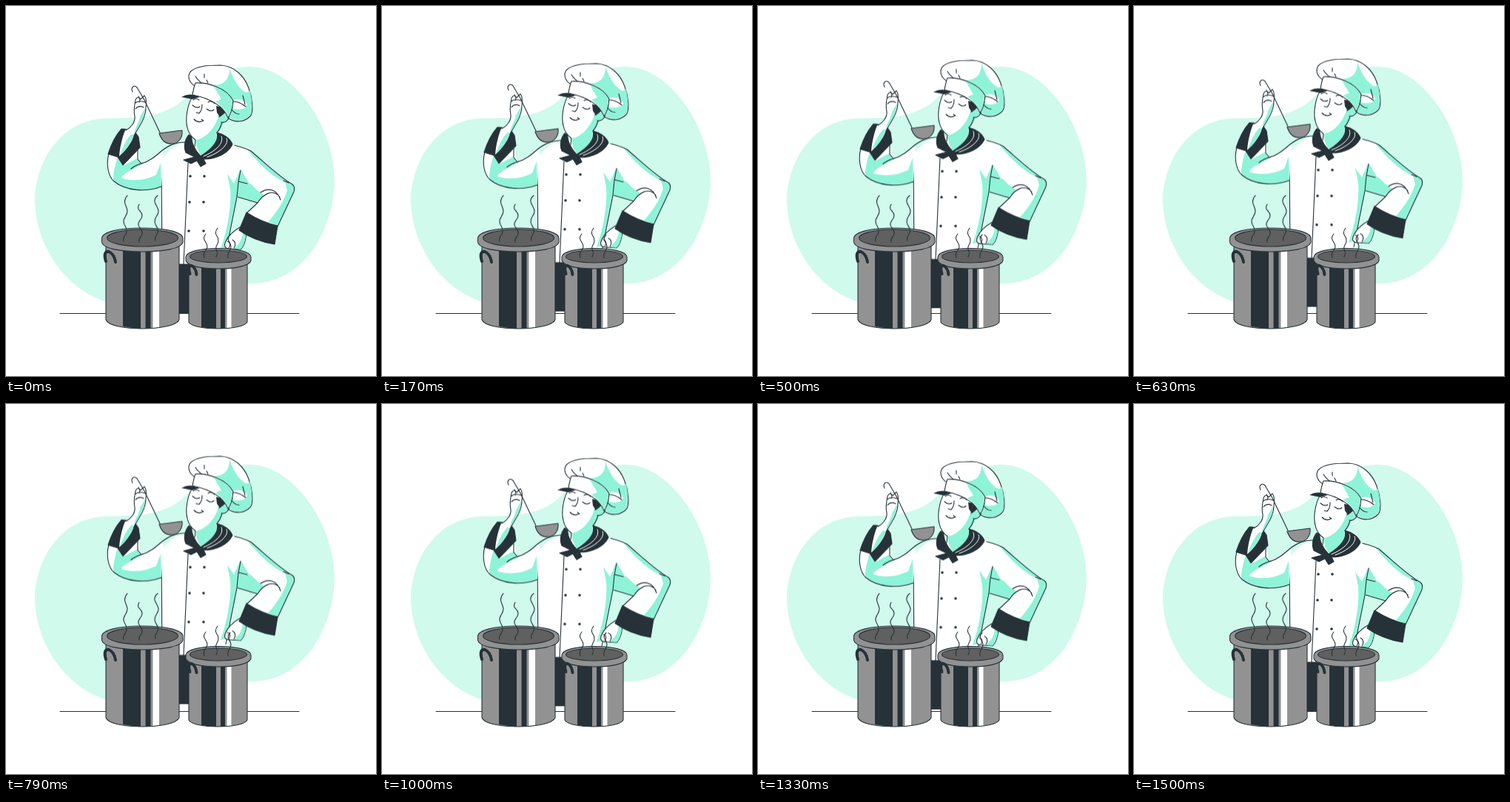
Animation, 500 px wide and 500 px high, one loop 1540 ms. Source, as an HTML page:

```html
<!DOCTYPE html>
<html lang="en">
<head>
<meta charset="utf-8">
<title>Chef tasting</title>
<style>
  html, body { margin: 0; width: 100%; height: 100%; overflow: hidden; background: #fff; }
  svg { display: block; width: 100%; height: 100%; }
  .ink { fill: #263238; }
  .mint { fill: #8ff3d8; }
  .white { fill: #fff; }
  .steel { fill: #929292; }
  .soup { fill: #606060; }
  .line { fill: none; }
  .edge { stroke: #263238; stroke-width: 1.1; stroke-linecap: round; stroke-linejoin: round; }
  .handle { fill: none; stroke: #263238; stroke-width: 4; stroke-linecap: round; }
  .fold { fill: none; stroke: #fff; stroke-width: 1; stroke-linecap: round; }
  .chef { animation: float 1540ms linear infinite; }
  @keyframes float {
    0%, 97.403%, 100% { transform: translateY(0); }
    48.701% { transform: translateY(-10px); }
  }
</style>
</head>
<body>
<svg viewBox="0 0 500 500">
  <path fill="#cffaec" d="M39 262C40 214 70 156 132 152C170 151 207 153 237 129C263 105 287 82 330 82C390 83 444 165 444 235C444 292 409 373 334 375C260 376 214 408 158 404C95 399 40 335 39 262Z"/>
  <path class="line edge" d="M73 415.5H396"/>

  <g class="chef">
    <path class="ink" d="M225 349H262V415H225Z"/>

    <g id="far-arm">
      <path class="white" d="M303 187C314 189 323 192 331 196C350 212 368 230 387 241Q391 244 389 251L367 298L325 280L340 266L313 258L300 230Z"/>
      <path class="mint" d="M326 194L331 196C350 212 368 230 387 241Q391 244 389 251L367 297L354 292C364 281 375 266 380 249L377 238C358 230 341 212 326 194Z"/>
      <path class="mint" d="M314 215L328 239L351 252L340 266L313 258Z"/>
      <path class="white" d="M318 214L331 236L362 248L349 255C335 248 323 232 318 214Z"/>
      <path class="line edge" d="M303 187C314 189 323 192 331 196C350 212 368 230 387 241Q391 244 389 251L367 298M313 258L340 266L325 280M340 266C347 255 360 246 370 258M344 252C354 245 366 247 371 262M375 236L382 239"/>
    </g>

    <g id="coat">
      <path class="white" d="M243 184C231 186 215 197 208 213L211 349H297L313 258L314 237L319 211L308 187Z"/>
      <path class="mint" d="M299 227L308 240L317 220L313 258L299 326L290 328C299 304 305 270 303 247Z"/>
      <path class="line edge" d="M210 213L211 349M246 212L240 349M317 222L314 238L312 258L297 334M314 237L326 240M232 349H247"/>
      <g class="ink">
        <circle cx="249" cy="230" r="1.8"/><circle cx="268" cy="230" r="1.8"/>
        <circle cx="248" cy="265" r="1.8"/><circle cx="267" cy="265" r="1.8"/>
        <circle cx="247" cy="304" r="1.8"/><circle cx="267" cy="304" r="1.8"/>
      </g>
    </g>

    <g id="fist">
      <path class="white edge" d="M316 299C306 305 300 311 297 318C294 324 296 328 301 328L317 329C322 325 324 316 325 307Z"/>
      <path class="mint" d="M320 306L324.500 308C323 318 321 325 317 328.500L307 328C315 323 319 316 320 306Z"/>
      <path class="line edge" d="M299 318C303 319 304 323 301 327M306 316C310 318 311 323 308 327"/>
      <path class="ink edge" d="M325 279C339 288 353 294 367 297L363 322C345 319 329 313 315 303Z"/>
    </g>

    <g id="near-arm">
      <path class="white" d="M139 199C135 214 138 230 146 237C162 250 189 252 210 244L213 196C202 204 194 209 183 214L179 195Z"/>
      <path class="mint" d="M151 203L158 216L177 206L184 214L163 225C158 229 154 231 157 233C176 238 192 234 203 228L209 212L210 244C189 252 162 250 146 237C143 232 148 214 151 203Z"/>
      <path class="line edge" d="M139 199C135 214 138 230 146 237C162 250 189 252 210 244M243 184C228 184 219 189 210 196C202 203 194 210 183 213L178 207V195M185 212C179 214 173 216 169 220"/>
      <path class="ink edge" d="M156 166C148 175 142 187 138 200L151 204L158 215L181 191L179 177L172 167Z"/>
      <path class="white" d="M161 168C157 178 154 190 153 203C161 195 170 186 173 174L178 160H170Z"/>
      <path class="mint" d="M174 169C171 182 163 195 154 202C159 187 164 177 174 169Z"/>
      <path class="white edge" d="M162 168C169 164 175 157 174 149C172 142 174 132 175 127C177 122 180 123 182 126L187 121C190 125 190 130 189 137C189 146 186 152 184 156C180 163 177 168 173 175"/>
      <path class="mint" d="M188 138C188 147 185 152 183 156C180 162 177 167 173 173C174 164 180 158 181 150Z"/>
      <path class="line edge" d="M175 131C178 128 182 128 188 130M175 139C178 135 182 135 186 137M179 122C181 125 182 127 180 130"/>
    </g>

    <g id="ladle">
      <path class="line edge" d="M171 116C168 110 173 106 177 110L187 127L208 171"/>
      <path class="steel edge" d="M207 172L238 168C239 178 233 186 224 186C215 187 210 181 207 172Z"/>
    </g>

    <g id="head">
      <path class="white" d="M253 119C245 132 242 153 245 164C247 174 252 178 256 181L254 190L263 205L286 190L285 172C291 166 293 157 298 145L285 126Z"/>
      <path class="mint" d="M288 146L294 155C292 164 289 169 284 171L287 190L264 203C258 194 256 187 257 181C270 179 283 165 288 146Z"/>
      <path class="line edge" d="M253 121C245 132 242 153 245 164C247 174 252 178 256 181L255 190M292 157C290 164 288 168 285 171"/>
      <path class="mint edge" d="M288 150C289 142 298 140 301 146C303 152 297 159 291 157"/>
      <path class="ink" d="M284 135L299 138C299 143 296 144 293 147L289 150L285 144Z"/>
      <path class="line edge" d="M253 127Q257 124 261 127M273 130Q278 127 282 132M252 134Q257 139 262 136M271 139Q277 144 281 140M265 133C265 138 263 143 261 145L257 144M254 153Q260 159 266 155M264 153L267 155"/>
    </g>

    <g id="hat">
      <path class="white edge" d="M255 108C247 103 245 95 249 89C257 81 273 80 290 80C308 81 322 94 328 111C333 125 335 143 330 149C322 157 310 158 301 152L303 136Z"/>
      <path class="mint" d="M302 84C306 96 311 106 320 114C326 119 330 116 329 113C333 126 334 143 329 148.500C321 156 310 157 302 151L306 130C299 117 290 110 279 107C290 107 302 104 302 84Z"/>
      <path class="white" d="M307 127C315 124 322 127 326 133C325 138 319 141 307 139Z"/>
      <path class="white edge" d="M256 104C273 103 298 111 307 128C306 139 304 146 300 151C295 138 281 126 252 120C253 114 254 109 256 104Z"/>
      <path class="mint" d="M281 109C294 113 302 119 306 129C305 139 303 145 300 149C296 140 290 134 283 129L291 126Z"/>
      <path class="ink" d="M237 123C242 120 247 119 252 120L262 123L252 126C247 125 242 124 237 123Z"/>
      <path class="line edge" d="M268 92L268 97M256 95C258 99 261 101 264 104M271 100L273 104M307 129C313 129 319 132 324 136M320 121L323 133M305 140C308 144 311 146 315 146"/>
    </g>

    <g id="scarf">
      <path class="ink edge" d="M247 174C241 181 240 191 243 198L255 204L240 208L250 213L258 209L263 217L270 213L267 207C285 207 300 199 306 187C303 179 294 173 285 171C288 180 283 190 263 203C255 195 250 183 251 177Z"/>
      <path class="fold" d="M291 176C295 185 284 196 267 203M298 179C302 186 290 198 272 204"/>
    </g>
  </g>

  <g id="big-pot">
    <path class="steel" d="M135 318V424C141 440 227 440 234 424V318Z"/>
    <path class="ink" d="M158 325H182V436Q169 435 158 433ZM188.500 325H195.500V435.500L188.500 436Z"/>
    <path class="white" d="M198.500 325H207V434L198.500 435.300Z"/>
    <path class="line edge" d="M135 318V424C141 440 227 440 234 424V318"/>
    <path class="steel edge" d="M129.500 314C130 305 154 300 184 300C214 300 239 305 239 314V319C237 328 213 332 184 332C155 332 131 328 129.500 319Z"/>
    <ellipse class="soup edge" cx="184.500" cy="313.500" rx="48" ry="11.500"/>
    <path class="handle" d="M135 345C132 336 134 331 139 332C144 334 147 340 148 346"/>
  </g>

  <g id="small-pot">
    <path class="steel" d="M247 344V427C253 439 320 439 326 427V344Z"/>
    <path class="ink" d="M264 350H284V436Q273 435.500 264 434ZM290 350H296V436H290Z"/>
    <path class="white" d="M298.500 350H304.500V435H298.500Z"/>
    <path class="line edge" d="M247 344V427C253 439 320 439 326 427V344"/>
    <path class="steel edge" d="M243 339C244 332 263 327.500 287 327.500C311 327.500 330 332 331 339V344C329 351 311 355 287 355C263 355 245 351 243 344Z"/>
    <ellipse class="soup edge" cx="287" cy="338.500" rx="38.500" ry="8.500"/>
    <path class="handle" d="M248.500 362C246 355 247 350 251 351C255 353 257 358 257.500 363"/>
  </g>

  <g id="steam" class="line edge">
    <path d="M164 256C156 266 164 270 164 277C164 284 158 286 159 292C160 298 164 299 163 305C162 311 157 312 159 318"/>
    <path d="M180 268C175 276 184 276 184 283C184 289 178 290 179 296C180 301 185 302 184 308C183 313 178 314 180 319"/>
    <path d="M205 256C195 265 206 270 206 277C206 284 200 285 201 292C202 298 207 300 205 306C204 311 200 311 202 317"/>
    <path d="M270 308C263 316 272 318 272 325C272 331 265 331 268 340"/>
    <path d="M286 300C279 309 288 311 287 317C287 323 282 324 284 329C286 333 286 335 284 339"/>
    <path d="M303 309C296 316 304 319 304 325C304 332 298 333 300 340"/>
  </g>
</svg>
</body>
</html>
```
